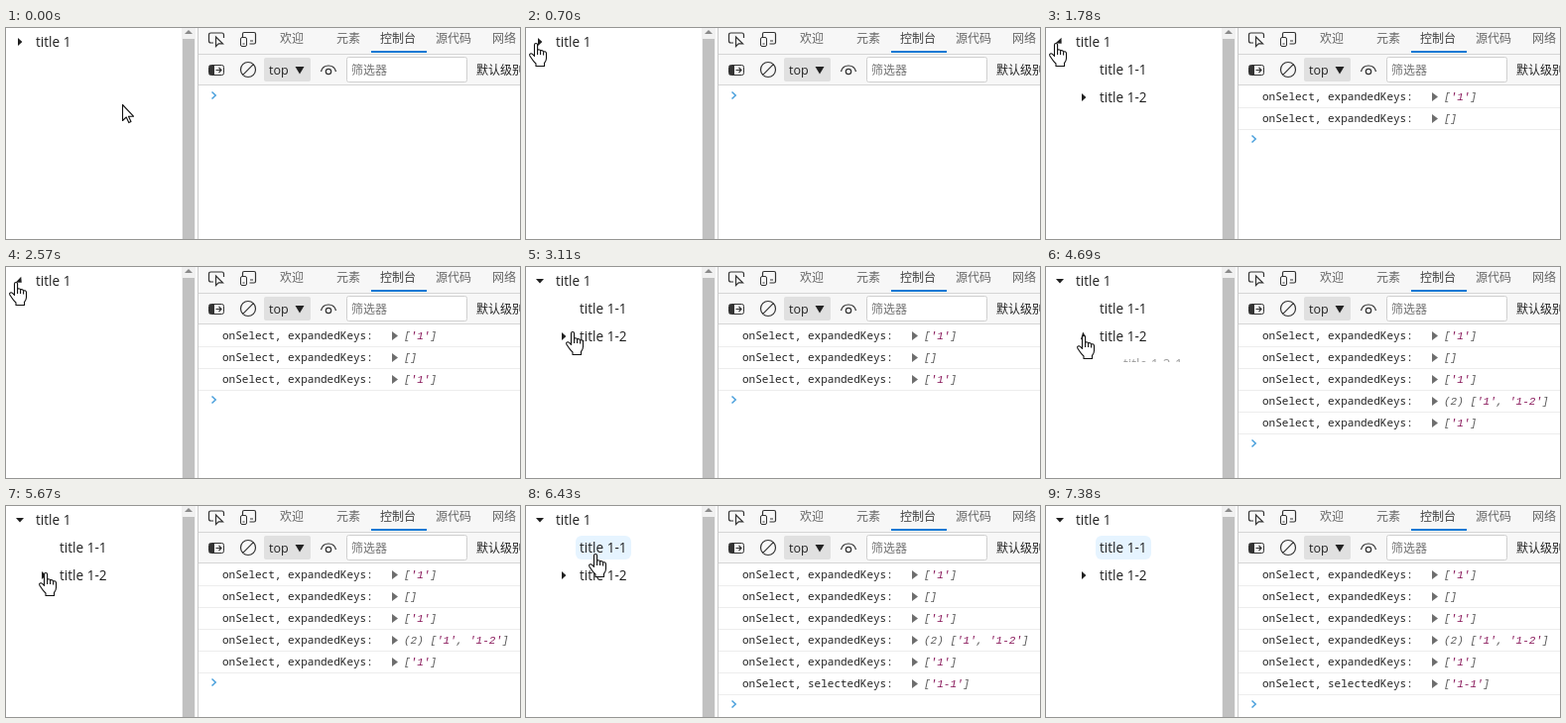
Recreate the animation shown at these times as an HTML page with a canvas. Size 518 px wide and 213 px high, loop 7.94 s.

```html
<!DOCTYPE html>
<html lang="zh">
<head>
<meta charset="utf-8">
<title>Tree and console</title>
<style>
  html, body { margin: 0; width: 100%; height: 100%; overflow: hidden; background: #fff; }
  canvas { display: block; }
</style>
</head>
<body>
<canvas id="stage" width="518" height="213"></canvas>
<script>
const ctx = document.getElementById('stage').getContext('2d');
const LOOP = 7940;
const UI = '13.6px "Open Sans", sans-serif';
const CJK = '12px "Noto Sans CJK SC", "Noto Sans CJK", sans-serif';
const MONO = '11px "Noto Sans Mono", monospace';
const MONO_ITALIC = 'italic 11px "Liberation Mono", monospace';

const TICKS = [0, 280, 400, 550, 700, 950, 1100, 1220, 1780, 1900, 2020, 2170,
  2570, 2720, 2840, 2960, 3110, 3260, 3380, 3500, 3620, 3760, 3880, 4570, 4690,
  4810, 4950, 5670, 5790, 5910, 6030, 6150, 6430, 6990, 7110, 7260, 7380];

const POINTER = [
  [0, 117, 77, 'arrow'], [280, 76, 58, 'arrow'], [400, 23, 34, 'arrow'],
  [550, 10, 21, 'hand'], [700, 3, 15, 'hand'], [2840, 20, 31, 'hand'],
  [2960, 40, 51, 'hand'], [3110, 40, 65, 'hand'], [3260, 36, 67, 'hand'],
  [3380, 33, 69, 'hand'], [3500, 31, 69, 'hand'], [5670, 33, 67, 'hand'],
  [5790, 38, 64, 'hand'], [5910, 48, 57, 'hand'], [6030, 58, 51, 'hand'],
  [6150, 63, 48, 'hand'], [6990, 78, 62, 'hand'], [7110, 98, 85, 'arrow'],
  [7260, 258, 181, 'arrow'], [7380, 0, 0, 'none']
];

const ROOT_CLICKS = [950, 1780, 2570];
const CHILD_CLICKS = [3620, 4570];
const SELECT_AT = 6430;
const LOGS = [
  [950, 'expandedKeys', "['1']"],
  [1780, 'expandedKeys', '[]'],
  [2570, 'expandedKeys', "['1']"],
  [3620, 'expandedKeys', "(2) ['1', '1-2']"],
  [4570, 'expandedKeys', "['1']"],
  [SELECT_AT, 'selectedKeys', "['1-1']"]
];

const HAND = new Path2D('M5.5 2Q5.5.5 7 .5Q8.6.5 8.6 2V7.5Q8.9 6.6 10 6.7Q11.5 6.8 11.6 8.3' +
  'Q12 7.4 13 7.6Q14.5 7.8 14.6 9.2Q15.2 8.5 16.2 8.8Q17.5 9.3 17.5 10.6V15.5Q17.4 18.5 15.5 20.5' +
  'V23.5H7V21Q4.6 19 3 16.3L.8 13Q.2 11.6 1.3 11Q2.6 10.4 3.8 11.6L5.5 13.4Z');
const KNUCKLES = new Path2D('M8.6 7.5V12M11.6 8.3V12M14.6 9.2V12.5');
const ARROW = new Path2D('M.5.5V16.5L4.2 13L6.8 18.6L9 17.6L6.5 12.2H11.5Z');

const clamp = v => Math.max(0, Math.min(1, v));
const latest = (list, t, key = v => v) => list.filter(v => key(v) <= t).pop();

function rect(x, y, w, h, color) {
  ctx.fillStyle = color;
  ctx.fillRect(x, y, w, h);
}

function pill(x, y, w, h, r, fill, stroke) {
  ctx.beginPath();
  ctx.roundRect(x, y, w, h, r);
  if (fill) { ctx.fillStyle = fill; ctx.fill(); }
  if (stroke) { ctx.strokeStyle = stroke; ctx.lineWidth = 1; ctx.stroke(); }
}

function text(str, x, y, font, color) {
  ctx.font = font;
  ctx.fillStyle = color;
  ctx.fillText(str, x, y);
}

function fillPath(d, color) {
  ctx.fillStyle = color;
  ctx.fill(new Path2D(d));
}

function line(d, color, width = 1.2) {
  ctx.strokeStyle = color;
  ctx.lineWidth = width;
  ctx.stroke(new Path2D(d));
}

// Openness of a branch: caret turn and list height, both 0..1.
function branch(clicks, t) {
  const click = latest(clicks, t);
  if (click === undefined) return { turn: 0, height: 0 };
  const opening = clicks.indexOf(click) % 2 === 0;
  const p = clamp((t - click + 110) / 400);
  const turn = 1 - (1 - p) ** 2;
  const q = clamp((t - click) / 220);
  const height = q * q * (3 - 2 * q);
  return opening ? { turn, height } : { turn: 1 - turn, height: 1 - height };
}

function caret(x, y, turn) {
  ctx.save();
  ctx.translate(x, y);
  ctx.rotate((turn - 1) * Math.PI / 2);
  fillPath('M-4-2H4L0 2.4Z', '#1f1f1f');
  ctx.restore();
}

function reveal(top, height, p, draw) {
  if (p <= 0) return;
  ctx.save();
  ctx.beginPath();
  ctx.rect(0, top, 176, height * p);
  ctx.clip();
  ctx.globalAlpha = p;
  draw();
  ctx.restore();
}

function node(label, x, y, tip, selected) {
  const width = label.length > 7 ? 56 : 43;
  const hover = tip && tip[0] > x - 4 && tip[0] < x - 4 + width && Math.abs(tip[1] - y) < 12;
  if (selected || hover) pill(x - 4, y - 12, width, 24, 6, selected ? '#e6f4ff' : '#f5f5f5');
  text(label, x, y + 5, UI, '#1f1f1f');
}

function drawTree(t, tip) {
  const root = branch(ROOT_CLICKS, t);
  const child = branch(CHILD_CLICKS, t);
  caret(14, 14, root.turn);
  text('title 1', 30, 19, UI, '#1f1f1f');
  reveal(28, 56, root.height, () => {
    node('title 1-1', 54, 42, tip, t >= SELECT_AT);
    caret(38, 70, child.turn);
    node('title 1-2', 54, 70, tip, false);
  });
  reveal(84, 28, child.height, () => text('title 1-2-1', 78, 103, UI, '#1f1f1f'));

  rect(177, 0, 14, 213, '#f1f1f1');
  rect(178, 11, 12, 202, '#c1c1c1');
  fillPath('M180 6L184 2L188 6Z', '#8a8a8a');
}

function drawToolbar() {
  rect(194, 0, 324, 57, '#f7f7f7');
  rect(193, 0, 1, 213, '#cbcbcb');
  rect(194, 26, 324, 1, '#d5d5d5');
  rect(194, 57, 324, 1, '#d5d5d5');

  const tabs = [['欢迎', 276], ['元素', 333], ['控制台', 377], ['源代码', 433], ['网络', 490]];
  for (const [label, x] of tabs) text(label, x, 15, CJK, label === '控制台' ? '#404040' : '#666');
  rect(368, 23, 56, 2, '#1078d4');

  const ink = '#333';
  line('M209 15H206.5Q204.5 15 204.5 13V7Q204.5 5 206.5 5H217.5Q219.5 5 219.5 7V10', ink);
  line('M211.5 9V18.5L214.3 15.8H218.5Z', ink);
  line('M238.5 9V6Q238.5 4.5 240 4.5H250Q251.5 4.5 251.5 6V14.5Q251.5 16 250 16H245.5M246 13H249', ink);
  pill(236.5, 9.5, 6, 9, 1.5, '#f7f7f7', ink);
  line('M238.5 16H240.5', ink, 1);

  pill(204.5, 37.5, 15, 10, 2, null, ink);
  rect(205, 38, 5, 9, ink);
  line('M211.5 42.5H217M214.5 40L217 42.5L214.5 45', ink, 1.2);
  line('M251.5 42A7.5 7.5 0 1 1 236.5 42A7.5 7.5 0 1 1 251.5 42M249.3 36.7L238.7 47.3', ink);

  pill(260, 30, 47, 24, 2, '#e0e0e0');
  text('top', 265, 47, '12.5px "Open Sans", sans-serif', '#222');
  fillPath('M291.5 39H300.5L296 46.5Z', '#222');

  line('M317.5 44Q319 38 325 38Q331 38 332.5 44', ink);
  line('M327.7 44A2.7 2.7 0 1 1 322.3 44A2.7 2.7 0 1 1 327.7 44', ink);
  pill(343.5, 29.5, 121, 25, 2, '#fff', '#d0d0d0');
  text('筛选器', 348, 47, CJK, '#757575');
  text('默认级别', 474, 47, CJK, '#222');
}

function drawValue(value, x, y) {
  ctx.font = MONO_ITALIC;
  for (const part of value.split(/('[^']*')/)) {
    const quoted = part[0] === "'";
    text(part, x, y, MONO_ITALIC, quoted ? '#8a1a5c' : '#5a5a5a');
    x += ctx.measureText(part).width;
  }
}

function drawConsole(t) {
  const rows = LOGS.filter(([at]) => at <= t);
  rows.forEach(([, key, value], i) => {
    const y = 69.5 + i * 22;
    text(`onSelect, ${key}:`, 218, Math.round(y + 3.5), MONO, '#222');
    fillPath(`M389 ${y - 4.5}L395 ${y}L389 ${y + 4.5}Z`, '#6e6e6e');
    drawValue(value, 401, Math.round(y + 3.5));
    rect(194, 80 + i * 22, 324, 1, '#ededed');
  });
  const y = 68 + rows.length * 22;
  line(`M207.5 ${y - 3.5}L211.2 ${y}L207.5 ${y + 3.5}`, '#4aa0dc', 1.5);
}

function drawPointer([, x, y, kind]) {
  if (kind === 'none') return;
  const shape = kind === 'hand' ? HAND : ARROW;
  ctx.save();
  ctx.translate(x, y);
  ctx.lineJoin = 'round';
  ctx.lineWidth = 1.1;
  ctx.strokeStyle = '#111';
  ctx.fillStyle = '#fff';
  ctx.fill(shape);
  ctx.stroke(shape);
  if (kind === 'hand') ctx.stroke(KNUCKLES);
  ctx.restore();
}

function frame() {
  const t = latest(TICKS, performance.now() % LOOP);
  const pointer = latest(POINTER, t, p => p[0]);
  const tip = pointer[3] === 'hand' ? [pointer[1] + 6, pointer[2]] : null;
  rect(0, 0, 518, 213, '#fff');
  drawTree(t, tip);
  drawToolbar();
  drawConsole(t);
  drawPointer(pointer);
  requestAnimationFrame(frame);
}
frame();
</script>
</body>
</html>
```
